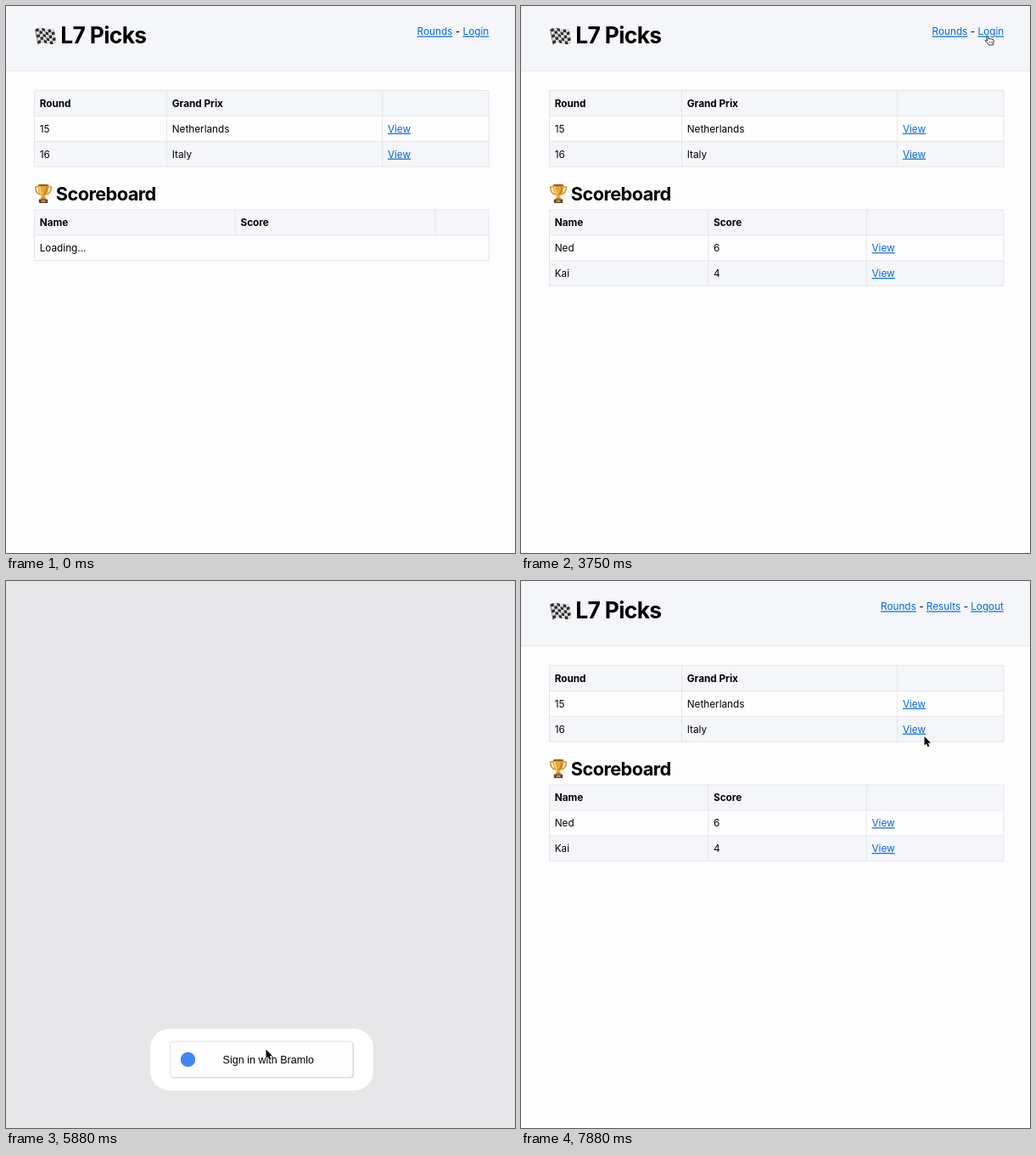
An HTML page for the animation above (8 s loop, 600 by 644 pixels).

```html
<!DOCTYPE html>
<html lang="en">
<head>
<meta charset="utf-8">
<title>Race picks</title>
<style>
html, body { margin: 0; width: 100%; height: 100%; overflow: hidden; background: #fefdfe; }
svg { display: block; width: 600px; height: 644px; }
text { font: 11.75px Inter, sans-serif; font-optical-sizing: none; white-space: pre; }
.b { font-weight: 700; }
.h1 { font-size: 26.4px; font-weight: 700; letter-spacing: -.025em; }
.h2 { font-size: 21.7px; font-weight: 700; letter-spacing: -.025em; }
.a { fill: #0066dd; text-decoration: underline; }
.btn { font: 12.55px "Liberation Sans", Arial, sans-serif; }
.line { fill: none; stroke: #e3e6ea; }
.bg { fill: #f4f6f9; }
</style>
</head>
<body>
<svg id="stage" viewBox="0 0 600 644"></svg>
<script>
const stage = document.getElementById('stage');
const text = (x, y, s, cls = '') => `<text x="${x}" y="${y}" class="${cls}">${s}</text>`;
const rect = (x, y, w, h, more) => `<rect x="${x}" y="${y}" width="${w}" height="${h}" ${more}/>`;
const path = (d, more) => `<path d="${d}" ${more}/>`;
const group = (id, body) => `<g id="${id}">${body}</g>`;

const ROW = 29.9, LEFT = 33.5, RIGHT = 569;

// rows: arrays of cell text; the first is the heading, "View" becomes a link
function table(top, cols, rows) {
  const height = rows.length * ROW;
  let out = '', lines = `M${LEFT} ${top}H${RIGHT}V${top + height}H${LEFT}Z`;
  rows.forEach((cells, r) => {
    const y = top + r * ROW;
    if (r % 2 == 0) out += rect(LEFT, y, RIGHT - LEFT, ROW, 'class="bg"');
    if (r) lines += `M${LEFT} ${y}H${RIGHT}`;
    if (cells.length > 1) for (const x of cols) lines += `M${x} ${y}v${ROW}`;
    cells.forEach((s, c) => {
      const x = (c ? cols[c - 1] : LEFT) + 6.2;
      out += text(x, y + 19.3, s, r ? (s == 'View' ? 'a' : '') : 'b');
    });
  });
  return out + path(lines, 'class="line"');
}

function flag() {
  let out = path('M34.6 27.5L38.2 45.5', 'stroke="#77736e" stroke-width="1.3"');
  const w = 3.6, h = 3.5;
  const at = (i, j) => `${35 + i * w + j * .55} ${27 + j * h - Math.sin(i * 1.05) * 1.1 - i * .1}`;
  for (let i = 0; i < 6; i++) for (let j = 0; j < 5; j++)
    out += path(`M${at(i, j)}L${at(i + 1, j)} ${at(i + 1, j + 1)} ${at(i, j + 1)}Z`,
      `fill="${(i + j) % 2 ? '#d9d9d7' : '#2d2d2d'}"`);
  return out;
}

const trophy =
  path('M38 213H34.8Q34.5 221 41 222M50 213H53.2Q53.5 221 47 222',
    'fill="none" stroke="#d8932b" stroke-width="1.6"') +
  path('M37.5 211H50.5Q50.5 221 46 223.5L45.3 227H42.7L42 223.5Q37.5 221 37.5 211Z', 'fill="#e8a534"') +
  path('M39.7 212.5Q40 219 42.4 221.5', 'fill="none" stroke="#ffd979" stroke-width="1.5"') +
  path('M48 212.5Q48 219 45 222', 'fill="none" stroke="#b46f1e" stroke-width="1.2"') +
  '<ellipse cx="44" cy="211" rx="6.6" ry="1.3" fill="#9b611e"/>' +
  rect(41, 225.5, 6, 2.2, 'fill="#c98327"') +
  rect(38.8, 227.5, 10.4, 4.5, 'rx=".8" fill="#62402a"') +
  rect(41.5, 228.7, 5, 2, 'fill="#d8a240"');

const arrow = path('M0 0V10.6L2.4 8.4 4.1 12.2 5.9 11.4 4.3 7.7H7.5Z',
  'stroke="#fff" stroke-width="1.2" paint-order="stroke"');
const hand = path('M-.9 .2Q.1-1 1 .4L2 3.5Q2.8 2.6 3.7 3.4Q4.7 2.7 5.5 3.6Q6.6 3 7.3 4.3' +
  'Q8.6 6.2 7.3 8.2L7 10.4H2L.4 8Q-1.2 7-2.3 5.4Q-2 4.2-.6 4.8L.4 5.5Z',
  'fill="#fff" stroke="#222" stroke-width=".95" stroke-linejoin="round"') +
  path('M3.1 6V8.4M4.6 6V8.4M6 6V8.4', 'stroke="#444" stroke-width=".6"');

stage.innerHTML =
  group('home',
    rect(0, 0, 600, 644, 'fill="#fefdfe"') +
    rect(0, 0, 600, 76, 'class="bg"') + path('M0 76.3H600', 'class="line"') +
    flag() + text(64.3, 43.9, 'L7 Picks', 'h1') +
    group('guestNav', text(484.6, 34.4, 'Rounds', 'a') + text(529.7, 34.4, '-') + text(538.5, 34.4, 'Login', 'a')) +
    group('userNav', text(424, 34.4, 'Rounds', 'a') + text(469.2, 34.4, '-') +
      text(477.8, 34.4, 'Results', 'a') + text(521.7, 34.4, '-') + text(530.2, 34.4, 'Logout', 'a')) +
    table(99.5, [189.5, 443.7],
      [['Round', 'Grand Prix', ''], ['15', 'Netherlands', 'View'], ['16', 'Italy', 'View']]) +
    trophy + text(58.8, 229.4, 'Scoreboard', 'h2') +
    group('loading', table(240, [270.3, 505.8], [['Name', 'Score', ''], ['Loading...']])) +
    group('scores', table(240, [220.8, 407.3],
      [['Name', 'Score', ''], ['Ned', '6', 'View'], ['Kai', '4', 'View']]))) +
  group('login',
    rect(0, 0, 600, 644, 'fill="#e7e6e8"') +
    rect(170, 527, 263, 73, 'rx="23" fill="#fff"') +
    rect(194.2, 542.8, 215.8, 42.4, 'rx="4" fill="#cbd0d5"') +
    rect(193.5, 542, 215.5, 42.3, 'rx="4" fill="#fefdff" stroke="#dde2e5"') +
    '<circle id="logo" cx="214.5" cy="563.3" r="8.7" fill="#4285f4"/>' +
    text(255.6, 567.5, 'Sign in with Bramlo', 'btn')) +
  group('cursor', group('arrow', arrow) + group('hand', hand));

// cursor moves: start, end, from, to, easing
const smooth = k => k * k * (3 - 2 * k), linear = k => k, speedUp = k => k * k;
const moves = [
  [1500, 1750, [182, 404], [183.5, 412], linear],
  [1750, 2250, [183.5, 412], [198, 423.5], smooth],
  [2625, 3500, [198, 423.5], [549.5, 35.5], smooth],
  [4375, 5250, [549.5, 35.5], [306.5, 551.5], smooth],
  [6000, 6000, [497.5, 488.5], [497.5, 488.5], linear],
  [6600, 7500, [497.5, 488.5], [492, 357], speedUp],
  [7500, 7875, [492, 357], [475.5, 183], linear],
];

function cursorAt(t) {
  const [start, end, a, b, ease] = moves.findLast(m => t >= m[0]) || moves[0];
  const k = end > start ? ease(Math.min(1, Math.max(0, (t - start) / (end - start)))) : 1;
  return a.map((v, i) => v + (b[i] - v) * k);
}

const show = (id, on) => document.getElementById(id).style.display = on ? '' : 'none';

function draw(now) {
  const t = Math.floor(now % 8000 / 125) * 125; // the screen refreshes eight times a second
  const signingIn = t >= 3875 && t < 6000;
  const pointing = t >= 3500 && t < 4250;
  show('home', !signingIn);
  show('login', signingIn);
  show('logo', t >= 4000);
  show('guestNav', t < 6000);
  show('userNav', t >= 6000);
  show('loading', t < 500);
  show('scores', t >= 500);
  show('cursor', t >= 1500);
  show('arrow', !pointing);
  show('hand', pointing);
  document.getElementById('cursor').setAttribute('transform', `translate(${cursorAt(t)})`);
  requestAnimationFrame(() => draw(performance.now()));
}
draw(performance.now());
</script>
</body>
</html>
```
